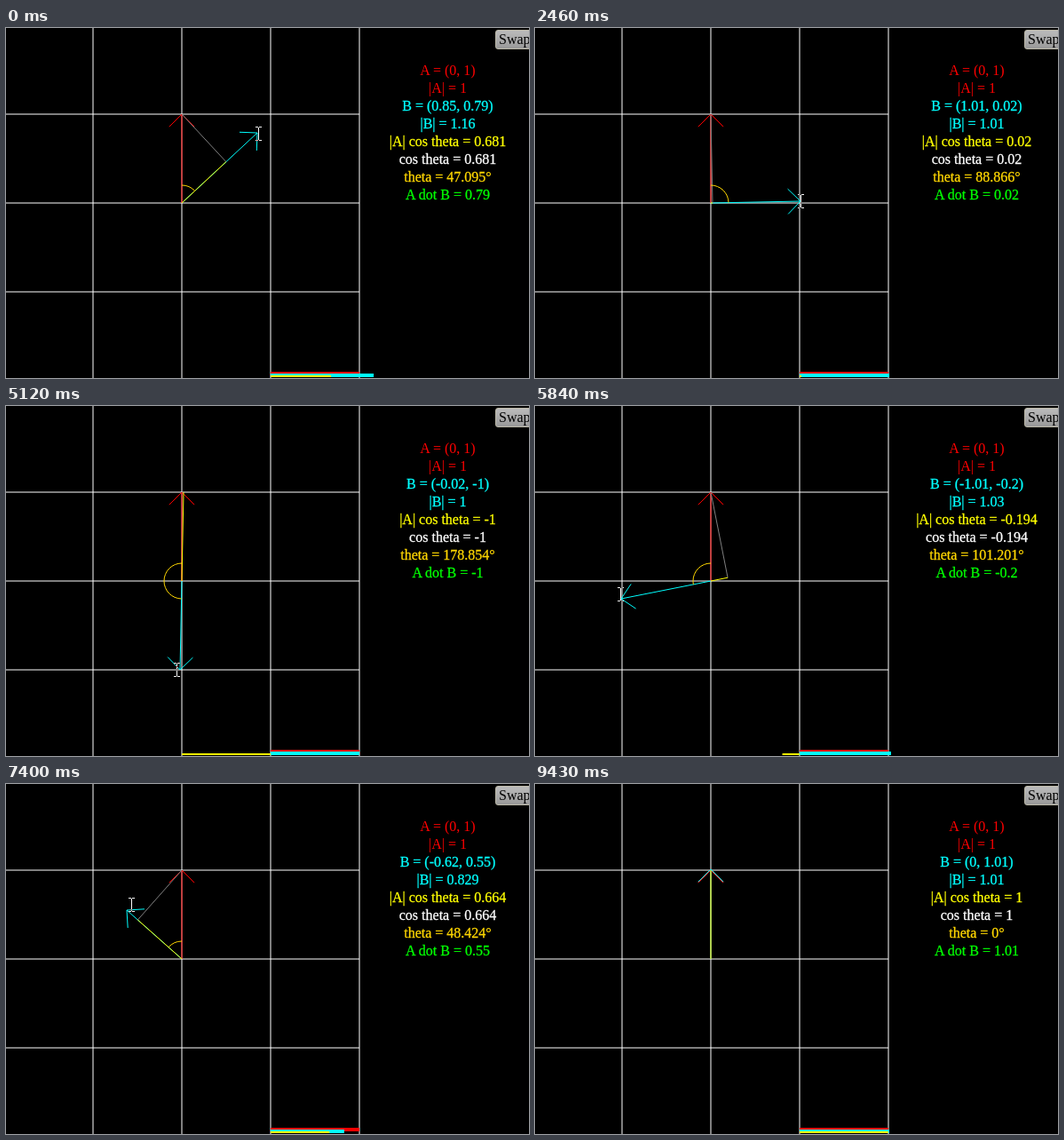
These frames come from a looping animation (589 by 394 pixels, 9840 ms). An HTML page with a canvas:

```html
<!DOCTYPE html>
<html lang="en">
<head>
<meta charset="utf-8">
<title>Dot product</title>
<style>
  html, body { margin: 0; width: 100%; height: 100%; overflow: hidden; background: #000; }
  body { position: relative; font: 16px "Liberation Serif", serif; }
  canvas { position: absolute; left: 0; top: 0; }
  #labels { position: absolute; left: 398px; top: 38px; width: 199px; text-align: center; line-height: 20px; white-space: nowrap; }
  #labels div:nth-child(n+3) { -webkit-text-stroke: 0.3px; }
  #swap { position: absolute; left: 551px; top: 2px; width: 50px; height: 22px; box-sizing: border-box;
    padding-left: 3px; border: 1px solid #bbb8a8; border-radius: 3px; line-height: 20px; color: #000;
    background: linear-gradient(#bbb, #999); }
</style>
</head>
<body>
<canvas width="589" height="394"></canvas>
<div id="labels"></div>
<div id="swap">Swap</div>
<script>
const LOOP = 9840, STEP = 55, UNIT = 100;
const LEAVE_START = 8625, LEAVE_END = 9430;
const ORIGIN = { x: 198, y: 197 };
const ctx = document.querySelector('canvas').getContext('2d');

// Each drag of B's tip ends at an angle (degrees clockwise from up) and a length
const drag = (start, end, angle, length) => ({ start, end, angle, length });
const drags = [
  drag(-STEP, -STEP, 47.095, 116.04),
  drag(-5, 400, 58, 110),
  drag(955, 1520, 76.92, 101.64),
  drag(1520, 1920, 86, 101),
  drag(2045, 2270, 88.9, 101),
  drag(2645, 2820, 90, 102),
  drag(3195, 3530, 101.056, 88.64),
  drag(3530, 4430, 180, 100),
  drag(5065, 5840, 258.8, 102.96),
  drag(5840, 6690, 270, 98),
  drag(7065, 7400, 311.58, 82.88),
  drag(7400, 8070, 359.4, 100),
  drag(8325, 8440, 360, 101),
  drag(LEAVE_START, LEAVE_END, 360, 101)
];

const labels = ['red', 'red', 'cyan', 'cyan', 'yellow', 'white', 'gold', 'lime'].map(color => {
  const row = document.createElement('div');
  row.style.color = color;
  document.getElementById('labels').append(row);
  return row;
});

const clamp = v => Math.min(1, Math.max(0, v));
const dragAt = t => drags.findLastIndex(d => d.start <= t);

// The pointer is sampled at a fixed rate while it moves
function snap(t) {
  const { start, end } = drags[dragAt(t)];
  return t >= end ? end : start + Math.floor((t - start) / STEP + 0.1) * STEP;
}

// Speed at the end of a drag: zero at rest, shared where the next one follows on
function speed(i, key) {
  const next = drags[i + 1];
  if (!next || next.start !== drags[i].end) return 0;
  return (next[key] - drags[i - 1][key]) / (next.end - drags[i].start);
}

function valueAt(t, key) {
  const i = dragAt(t), to = drags[i], from = drags[i - 1];
  const span = to.end - to.start, u = clamp((t - to.start) / span), v = 1 - u;
  return from[key] + (to[key] - from[key]) * u * u * (3 - 2 * u)
    + span * u * v * (speed(i - 1, key) * v - speed(i, key) * u);
}

function tipAt(t) {
  const angle = valueAt(t, 'angle') * Math.PI / 180, length = valueAt(t, 'length');
  return { x: Math.round(length * Math.sin(angle)), y: -Math.round(length * Math.cos(angle)) };
}

function line(color, x0, y0, x1, y1, width = 1) {
  ctx.strokeStyle = color;
  ctx.lineWidth = width;
  ctx.beginPath();
  ctx.moveTo(x0, y0);
  ctx.lineTo(x1, y1);
  ctx.stroke();
}

function arrow(color, { x, y }) {
  line(color, 0, 0, x, y);
  const back = Math.atan2(-y, -x);
  for (const turn of [-Math.PI / 4, Math.PI / 4]) {
    line(color, x, y, x + 20 * Math.cos(back + turn), y + 20 * Math.sin(back + turn));
  }
}

function drawCursor(x, y) {
  ctx.globalCompositeOperation = 'difference';
  ctx.fillStyle = 'white';
  ctx.fillRect(x, y - 7, 1, 14);
  for (const edge of [y - 8, y + 7]) {
    ctx.fillRect(x - 3, edge, 3, 1);
    ctx.fillRect(x + 1, edge, 3, 1);
  }
  ctx.globalCompositeOperation = 'source-over';
}

function draw(t) {
  const time = Math.max(0, snap(t));
  const a = { x: 0, y: -UNIT }, b = tipAt(time);
  const length = Math.hypot(b.x, b.y);
  const cos = -b.y / length;
  const theta = Math.atan2(b.x, -b.y);
  const foot = { x: b.x * cos * UNIT / length, y: b.y * cos * UNIT / length };

  ctx.setTransform(1, 0, 0, 1, 0, 0);
  ctx.fillStyle = 'black';
  ctx.fillRect(0, 0, 589, 394);
  for (let x = 98; x <= 398; x += UNIT) line('white', x, 0, x, 394);
  for (let y = 97; y <= 297; y += UNIT) line('white', 0, y, 398, y);

  ctx.translate(ORIGIN.x, ORIGIN.y);
  arrow('red', a);
  arrow('cyan', b);
  line('gray', a.x, a.y, foot.x, foot.y);
  line('yellow', 0, 0, foot.x, foot.y);
  ctx.strokeStyle = 'gold';
  ctx.beginPath();
  ctx.arc(0, 0, 20, -Math.PI / 2, theta - Math.PI / 2, theta < 0);
  ctx.stroke();

  line('red', 100, 192, 200, 192, 4);
  line('cyan', 100, 194, 100 + length, 194, 4);
  line('yellow', 100, 195, 100 + cos * UNIT, 195, 2);

  const leave = clamp((time - LEAVE_START) / (LEAVE_END - LEAVE_START));
  const pointer = tipAt(time + STEP);
  drawCursor(pointer.x + Math.round(346 * leave), pointer.y + Math.round(312 * leave));

  const num = v => String(+v.toFixed(3) || 0);
  [
    'A = (0, 1)',
    '|A| = 1',
    `B = (${num(b.x / UNIT)}, ${num(-b.y / UNIT)})`,
    `|B| = ${num(length / UNIT)}`,
    `|A| cos theta = ${num(cos)}`,
    `cos theta = ${num(cos)}`,
    `theta = ${num(Math.abs(theta) * 180 / Math.PI)}°`,
    `A dot B = ${num(-b.y / UNIT)}`
  ].forEach((text, i) => { labels[i].textContent = text; });
}

function frame() {
  draw(performance.now() % LOOP);
  requestAnimationFrame(frame);
}
frame();
</script>
</body>
</html>
```
